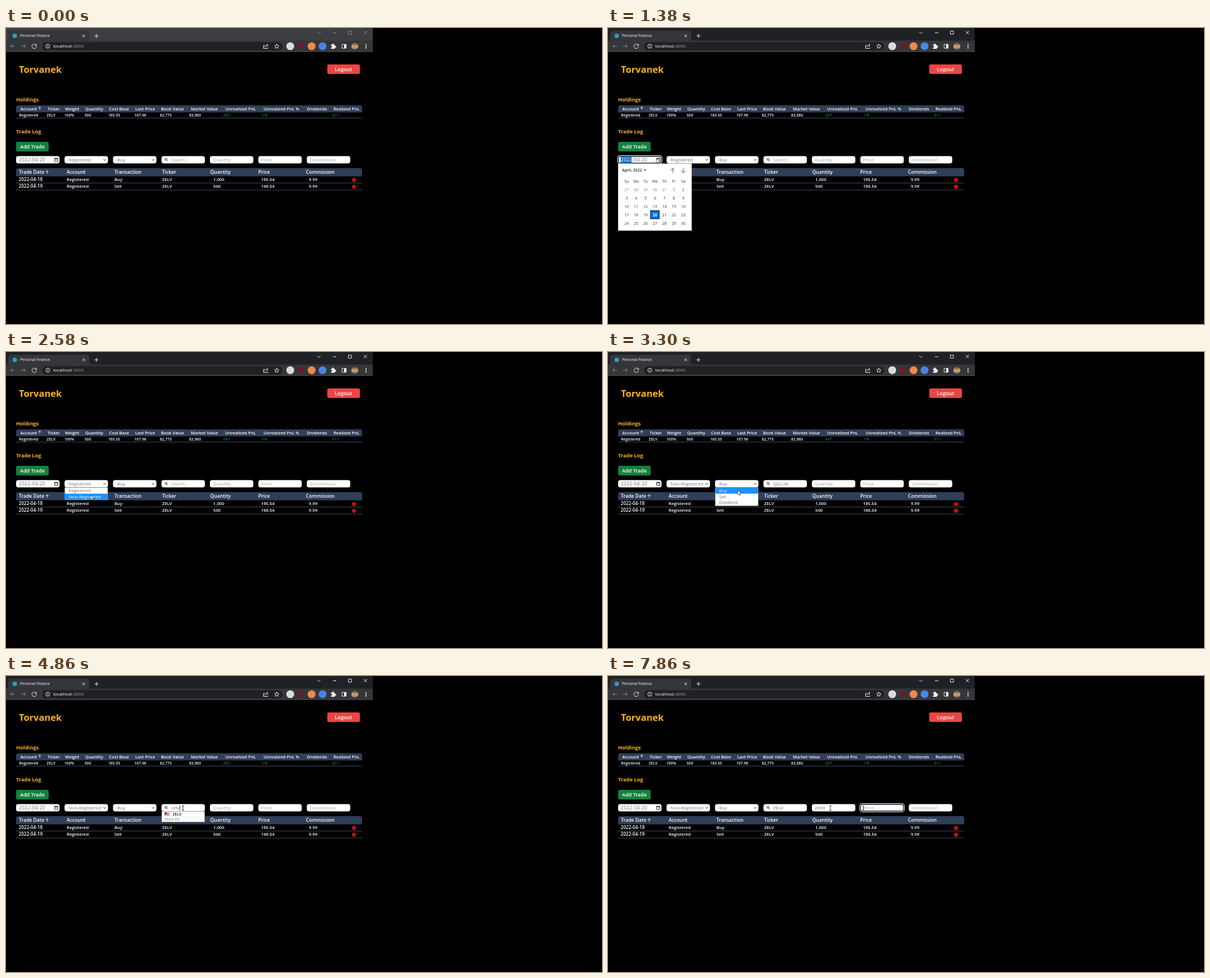
Animation of 1061x528 px, one loop 8000 ms. Source, as an HTML page:

```html
<!DOCTYPE html>
<html lang="en">
<head>
<meta charset="utf-8">
<title>Personal Finance</title>
<style>
  html, body { margin: 0; width: 100%; height: 100%; overflow: hidden; background: #000; }
  svg { display: block; width: 1061px; height: 528px; }
  text { font-family: "Open Sans", "Noto Sans", sans-serif; font-size: 8px; fill: #fff; white-space: pre; }
  .line { fill: none; stroke: #e8eaed; stroke-width: 1; }
  .dim { stroke: #85888c; }
  .ink { stroke: #222; }
  .head { font-size: 7.6px; font-weight: 600; }
  .cell { font-size: 6.75px; font-weight: 600; }
  .gain { font-size: 6.9px; fill: #12ac4c; }
  .head2 { font-size: 8.6px; font-weight: 600; }
  .cell2 { font-size: 7.7px; font-weight: 600; }
  .date2 { font-size: 8.2px; font-weight: 600; }
  .title { font-weight: 700; fill: #fbb024; font-size: 9.3px; }
  .button { font-weight: 600; font-size: 9px; }
  .value { fill: #6b7280; }
  .hint { fill: #9ca0a8; }
  .date { font-size: 8.2px; letter-spacing: .45px; }
  .day { font-size: 6.8px; fill: #333; text-anchor: middle; }
  .out { fill: #8a8a8a; }
  .picked { fill: #fff; font-weight: 700; }
  .tick { font-size: 7px; font-weight: 600; fill: #222; }
  .firm { font-size: 6.7px; fill: #777; }
</style>
</head>
<body>
<svg viewBox="0 0 1061 528">
  <defs>
    <linearGradient id="face" x2="0" y2="1">
      <stop offset="0" stop-color="#5b4a3c"/><stop offset=".55" stop-color="#d9a566"/><stop offset="1" stop-color="#56697a"/>
    </linearGradient>
    <clipPath id="calClip"><rect x="18" y="241.5" width="131" height="120"/></clipPath>
  </defs>

  <!-- browser -->
  <rect id="strip" width="653" height="23"/>
  <path d="M0 23Q4 23 4 19V10Q4 5 9 5H143Q148 5 148 10V19Q148 23 152 23Z" fill="#35363a"/>
  <rect y="22.5" width="653" height="20" fill="#35363a"/>
  <rect y="41.5" width="653" height="1" fill="#4b4d53"/>
  <circle cx="15.5" cy="14" r="4" fill="#2c9fb8"/>
  <text x="25" y="16.3" style="font-size:6.7px">Personal Finance</text>
  <path class="line" d="M136 11.7l4.6 4.6m0-4.6l-4.6 4.6M157.3 14h7.4M161 10.3v7.4"/>
  <g id="controls" class="line">
    <path d="M554 6.8l3 3 3-3M582 8.5h6M609.5 5.5h5.5v5.5h-5.5zM637 5.3l5.6 5.6m0-5.6l-5.6 5.6"/>
  </g>
  <rect x="64" y="25.3" width="428" height="14.8" rx="7.4" fill="#202124"/>
  <path class="line dim" d="M16 32.5H8.3m3.5-3.5l-3.5 3.5 3.5 3.5M27 32.5h7.7m-3.5-3.5l3.5 3.5-3.5 3.5"/>
  <path class="line" stroke-width="1.2" d="M53.6 30.3A4 4 0 1 0 54.3 33.4M54.3 28.5v2.8h-2.9"/>
  <circle class="line" cx="74.5" cy="32.5" r="3.6"/>
  <path class="line" d="M74.5 32v2.5M74.5 30.2v1"/>
  <text x="84" y="35.3">localhost<tspan fill="#9aa0a6">:3000</tspan></text>
  <path class="line" d="M461 31h-2.5v5.5h7.5v-2M461 34.5q.5-4 5-4m-2-2.2l2.3 2.2-2.3 2.2"/>
  <path class="line" d="M482 28.6l1.2 2.6 2.8.3-2.1 1.9.6 2.8-2.5-1.4-2.5 1.4.6-2.8-2.1-1.9 2.8-.3z"/>
  <g id="addons"></g>
  <path fill="#fff" d="M578.5 30h2.2a1.5 1.5 0 1 1 2.6 0h2.2v2.2a1.5 1.5 0 1 1 0 2.6v2.2h-7v-2.2a1.5 1.5 0 1 0 0-2.6z"/>
  <path class="line" d="M598.3 29.2h7v6.8h-7z"/><rect x="602" y="29" width="4" height="7.2" fill="#fff"/>
  <circle cx="621" cy="32.5" r="6.3" fill="url(#face)"/>
  <path fill="#fff" d="M640 28.8h1.8v1.8H640zM640 31.7h1.8v1.8H640zM640 34.6h1.8v1.8H640z"/>

  <!-- page -->
  <text class="title" x="23" y="80" style="font-size:16.5px">Torvanek</text>
  <rect x="572" y="65" width="58" height="17" rx="3" fill="#ef4444"/>
  <text class="button" x="585.3" y="76.7" style="font-size:9.2px">Logout</text>
  <text class="title" x="18" y="131">Holdings</text>
  <text class="title" x="18" y="187.5">Trade Log</text>
  <rect x="18" y="203" width="58" height="17.3" rx="3" fill="#15803d"/>
  <text class="button" x="25" y="215">Add Trade</text>
  <path fill="#303f58" d="M18 150.5V142q0-4 4-4H630q4 0 4 4V150.5zM18 264.5V254q0-4 4-4H630q4 0 4 4V264.5z"/>
  <path stroke="#3d4a60" d="M18 160.5H634M18 276.5H634M18 289H634"/>
  <path class="line" d="M60 145.5v-5m-2.3 2.3l2.3-2.3 2.3 2.3M73.3 260v-5.8m-2.7 2.7l2.7-2.7 2.7 2.7"/>
  <g id="page"></g>
  <g id="overlay"></g>

  <g id="pointer">
    <path data-t="60-3560 5100-5600" fill="#fff" stroke="#222" stroke-width=".7" d="M0 0V8.4l2-1.8 1.4 3 1.5-.7-1.4-2.9h2.7z"/>
    <path data-t="3560-5100 5600-8000" class="line ink" d="M-1.8-4H-.5Q0-4 0-3.3V3.3Q0 4-.5 4H-1.8M1.8-4H.5Q0-4 0-3.3M0 3.3Q0 4 .5 4H1.8"/>
  </g>
</svg>
<script>
const LOOP = 8000;
const $ = id => document.getElementById(id);
const page = $('page'), overlay = $('overlay');

function add(parent, tag, attrs, content) {
  const el = document.createElementNS('http://www.w3.org/2000/svg', tag);
  for (const k in attrs) el.setAttribute(k, attrs[k]);
  if (content !== undefined) el.textContent = content;
  parent.append(el);
  return el;
}
// "when" lists the spans of time, in ms, in which the part is seen
const timed = (attrs, when) => when ? { ...attrs, 'data-t': when } : attrs;
const text = (parent, cls, x, y, str, when) => add(parent, 'text', timed({ class: cls, x, y }, when), str);
const rect = (parent, x, y, width, height, fill, when) => add(parent, 'rect', timed({ x, y, width, height, fill }, when));
const row = (cls, y, xs, words) => words.split('|').forEach((w, i) => text(page, cls, xs[i], y, w));

for (const [cx, r, fill] of [[506, 7, '#d9dcdf'], [525, 4.6, '#7d1424'], [544, 7, '#ec8b4a'], [563.5, 7, '#4b83e6']])
  add($('addons'), 'circle', { cx, cy: 32.5, r, fill });

// tables
row('head', 147, [25.5, 74, 105, 141, 183.5, 230, 276, 329, 390, 458.5, 535.5, 583],
  'Account|Ticker|Weight|Quantity|Cost Base|Last Price|Book Value|Market Value|Unrealized PnL|Unrealized PnL %|Dividends|Realized PnL');
row('cell', 158.2, [23, 72.5, 104, 140, 182, 228.5, 274, 326], 'Registered|ZELV|100%|500|165.55|167.96|82,775|83,980');
row('gain', 158.2, [387, 455.5, 534, 581], '647|1%|-|611');
row('head2', 260.3, [23, 108, 193, 278, 363.5, 449, 534], 'Trade Date|Account|Transaction|Ticker|Quantity|Price|Commission');
['2022-04-18|Registered|Buy|ZELV|1,000|165.54|9.99', '2022-04-19|Registered|Sell|ZELV|500|166.54|9.99'].forEach((line, i) => {
  const y = 273.2 + 12.1 * i, cut = line.indexOf('|');
  text(page, 'date2', 22.5, y, line.slice(0, cut));
  row('cell2', y, [108, 193, 278, 369, 454, 539], line.slice(cut + 1));
  add(page, 'circle', { cx: 619.5, cy: y - 2, r: 3.5, fill: '#e80f14' });
  rect(page, 617.5, y - 2.5, 4, 1, '#400');
});

// form
const fieldX = i => 18 + 86.25 * i;
const BASE = 238.4;
for (let i = 0; i < 7; i++)
  add(page, 'rect', { x: fieldX(i), y: 228.5, width: 77.3, height: 13, rx: 4, fill: '#fff' });

function ring(i, when) {
  const g = add(page, 'g', timed({ fill: 'none' }, when));
  add(g, 'rect', { x: fieldX(i) - 1, y: 227.6, width: 79.2, height: 14.8, rx: 4.5, stroke: '#e6ebf5', 'stroke-width': 1.2 });
  add(g, 'rect', { x: fieldX(i) + .4, y: 229, width: 76.4, height: 12, rx: 3.6, stroke: '#101820', 'stroke-width': 1.3 });
}
const FOCUS = '900-2220';
ring(0, FOCUS);
ring(4, '5700-7200');
ring(5, '7200-8000');

text(page, 'value date', 23, BASE, '2022-04-20');
rect(page, 22.5, 230, 20, 10.6, '#0a76d8', FOCUS);
text(page, 'date', 23, BASE, '2022', FOCUS);
add(page, 'path', { class: 'line ink', d: 'M86.6 232.8h5.8v5h-5.8zM86.6 233.4h5.8M88 231.4v1.2M91 231.4v1.2' });
for (const x of [175.5, 262])
  add(page, 'path', { class: 'line ink', 'stroke-width': 1.2, d: `M${x - 2.3} 234l2.3 2.3 2.3-2.3` });

text(page, 'value', 111.5, BASE, 'Registered', '0-2640');
text(page, 'value', 111.5, BASE, 'Non-Registered', '2640-8000');
text(page, 'value', 198, BASE, 'Buy');

add(page, 'circle', { class: 'line ink', cx: 284.8, cy: 234.2, r: 1.7 });
add(page, 'path', { class: 'line ink', d: 'M286 235.5l2 2' });
text(page, 'hint', 294, BASE, 'Search...', '0-2700');
text(page, 'value', 294, BASE, 'QZU,XE', '2700-3660');
rect(page, 293.5, 230, 32, 10.6, '#0a76d8', '3660-4380');
text(page, '', 294, BASE, 'QZU,XE', '3660-4380');
text(page, 'value', 294, BASE, 'ZELV', '5340-8000');

text(page, 'hint', 368, BASE, 'Quantity', '0-6780');
[6780, 6840, 6900, 6960, 8000].forEach((t, i, all) => {
  if (i < 4) text(page, 'value', 368, BASE, '2000'.slice(0, i + 1), `${t}-${all[i + 1]}`);
});
text(page, 'hint', 454.5, BASE, 'Price');
text(page, 'hint', 541, BASE, 'Commission');

const caret = (x, when) => rect(page, x, 230.8, .9, 9.2, '#222', when);
caret(309, '4860-5340');
caret(367.6, '5760-6060 6420-6720');
caret(454, '7200-7500 7860-8000');

// calendar
const cal = add(overlay, 'g', { 'data-t': '900-1860', 'clip-path': 'url(#calClip)' });
rect(cal, 18, 241.5, 131, 121, '#fff');
text(cal, 'tick', 25, 256, 'April, 2022');
add(cal, 'path', { fill: '#222', d: 'M63.5 252.5h4.4l-2.2 2.6z' });
add(cal, 'path', { class: 'line', style: 'stroke:#555', d: 'M115 258.5v-8.3m-4 4l4-4 4 4M134 250v8.3m-4-4l4 4 4-4' });
const dayX = i => 33.2 + 16.8 * (i % 7);
['Su', 'Mo', 'Tu', 'We', 'Th', 'Fr', 'Sa'].forEach((d, i) => text(cal, 'day', dayX(i), 275.5, d));
add(cal, 'rect', { x: 75.8, y: 325.8, width: 15.4, height: 14.4, fill: '#0d72ea', stroke: '#10243c', 'stroke-width': 1.3 });
for (let i = 0; i < 42; i++) {
  const n = i < 5 ? 27 + i : (i - 5) % 30 + 1;
  const cls = i === 24 ? ' picked' : i < 5 || i > 34 ? ' out' : '';
  text(cal, 'day' + cls, dayX(i), 290.6 + 15 * Math.floor(i / 7), n);
}

// drop-down lists
function list(i, words, active, when) {
  const g = add(overlay, 'g', { 'data-t': when }), x = fieldX(i), h = 10.7;
  add(g, 'rect', { x: x + .4, y: 241.7, width: 76.5, height: h * words.length + .6, fill: '#fff', stroke: '#777', 'stroke-width': .7 });
  rect(g, x + .7, 242 + h * active, 76, h, '#1e90ff');
  words.forEach((w, k) => text(g, k === active ? '' : 'value', x + 7.3, 250 + h * k, w));
}
const accounts = ['Registered', 'Non-Registered'];
list(1, accounts, 0, '2220-2400');
list(1, accounts, 1, '2400-2640');
list(2, ['Buy', 'Sell', 'Dividend'], 0, '3000-3420');

const hits = [['ZELV', 'Zelvo Inc'], ['ZELQ', 'Zelquin Ltd'], ['ZEKU', 'Zekumar Co'], ['ZEWI', 'Zewinto Inc'], ['ZUVQ', 'Zuvaqe Corp'], ['ZIHO', 'Zihorel Ltd']];
function results(typed, count, when) {
  text(page, 'value', 294, BASE, typed, when);
  const g = add(overlay, 'g', { 'data-t': when });
  add(g, 'rect', { x: 277.2, y: 241.7, width: 76.4, height: 18.5 + 19.5 * (count - 1), fill: '#fff', stroke: '#999', 'stroke-width': .5 });
  hits.slice(0, count).forEach(([tick, firm], k) => {
    const y = 241.5 + 19.5 * k;
    rect(g, 282, y + 2, 9.5, 5.6, '#fff');
    for (let s = 0; s < 4; s++) rect(g, 282, y + 2 + 1.6 * s, 9.5, .8, '#d0454c');
    rect(g, 282, y + 2, 4.6, 3.2, '#3c4a8c');
    text(g, 'tick', 296.5, y + 7.4, tick);
    rect(g, 277.5, y + 9.6, 75.8, .5, '#ccc');
    text(g, 'firm', 282, y + 16.8, firm);
  });
}
results('z', 6, '4380-4500');
results('ze', 4, '4500-4620');
results('zel', 2, '4620-4800');
results('zelv', 1, '4800-5340');

// pointer stops: time, x, y
const stops = [[60, 190, 345], [780, 86, 233], [1740, 86, 233], [2100, 160, 234], [2220, 160, 234], [2460, 150, 255],
  [2640, 150, 255], [2940, 231, 236], [3000, 231, 236], [3180, 231, 246.5], [3420, 231, 246.5], [3600, 315, 235.5],
  [5040, 315, 235.5], [5280, 300, 249], [5400, 300, 249], [5640, 396, 235.5], [LOOP, 396, 235.5]];

function pointerAt(t) {
  const k = Math.max(1, stops.findIndex(s => s[0] > t));
  const [t0, x0, y0] = stops[k - 1], [t1, x1, y1] = stops[k];
  const p = Math.max(0, (t - t0) / (t1 - t0)), e = p * p * (3 - 2 * p);
  return `translate(${x0 + (x1 - x0) * e} ${y0 + (y1 - y0) * e})`;
}

const parts = [...document.querySelectorAll('[data-t]')].map(el =>
  ({ el, spans: el.dataset.t.split(' ').map(s => s.split('-').map(Number)) }));

function draw(t) {
  for (const { el, spans } of parts)
    el.style.display = spans.some(([a, b]) => t >= a && t < b) ? '' : 'none';
  const active = t >= 420;
  $('strip').setAttribute('fill', active ? '#202124' : '#3c3e42');
  $('controls').style.stroke = active ? '#e8eaed' : '#85888c';
  $('pointer').setAttribute('transform', pointerAt(t));
}

const start = performance.now();
function tick() {
  draw((performance.now() - start) % LOOP);
  requestAnimationFrame(tick);
}
tick();
</script>
</body>
</html>
```
